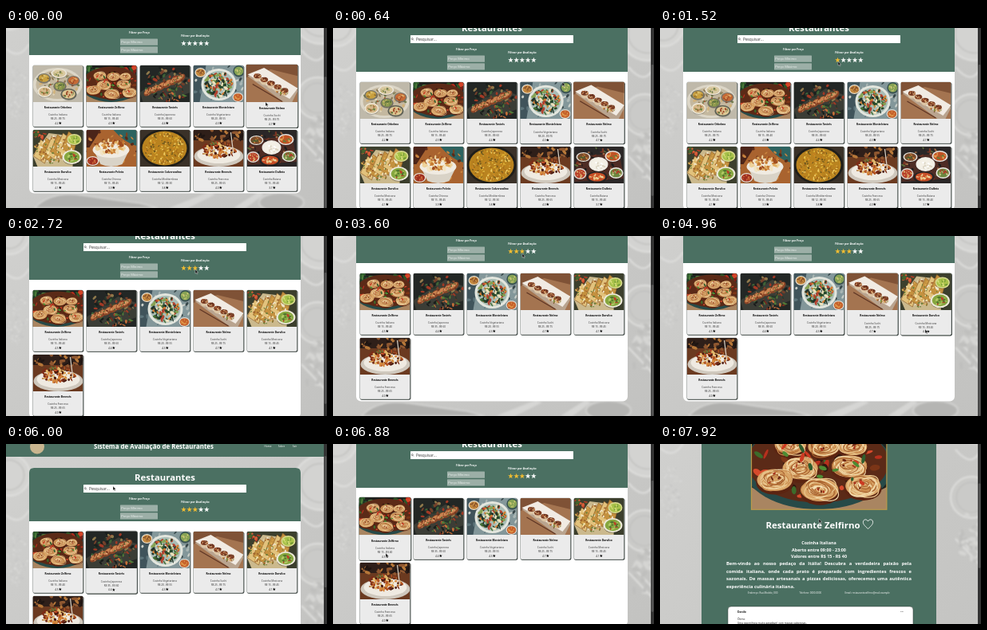
An HTML page that plays this animation: 402 by 226 pixels, repeating every 8 s.

```html
<!DOCTYPE html>
<html lang="pt">
<head>
<meta charset="utf-8">
<title>Restaurantes</title>
<style>
html, body { margin: 0; width: 100%; height: 100%; overflow: hidden; background: #c9c9c7; }
svg { display: block; width: 100vw; height: 100vh; }
svg, div { font-family: "Open Sans", "Noto Sans", sans-serif; }
.b { font-weight: 700; }
.about { color: #fff; font-weight: 700; font-size: 5.78px; line-height: 9.5px; }
.about div { text-align-last: justify; white-space: nowrap; }
.about div:last-child { text-align-last: left; }
</style>
</head>
<body>
<svg id="stage" viewBox="0 0 402 226" xmlns="http://www.w3.org/2000/svg"></svg>
<script>
const LOOP = 8000, TICK = 80, GREEN = '#4b7062';
const stage = document.getElementById('stage');

function seeded(seed) {
  return () => {
    seed = (seed * 16807) % 2147483647;
    return seed / 2147483647;
  };
}

// Drawing helpers
const rect = (x, y, w, h, fill, r = 0, more = '') =>
  `<rect x="${x}" y="${y}" width="${w}" height="${h}" rx="${r}" fill="${fill}" ${more}/>`;
const oval = (x, y, rx, ry, fill, more = '') =>
  `<ellipse cx="${x}" cy="${y}" rx="${rx}" ry="${ry}" fill="${fill}" ${more}/>`;
const path = (d, fill, more = '') => `<path d="${d}" fill="${fill}" ${more}/>`;
const text = (s, x, y, size, fill, bold = false, anchor = 'middle') =>
  `<text x="${x}" y="${y + size * 0.36}" font-size="${size}" fill="${fill}" text-anchor="${anchor}"${bold ? ' class="b"' : ''}>${s}</text>`;
const turn = (a, x, y) => `transform="rotate(${a} ${x} ${y})"`;

function starPath(r) {
  let d = '';
  for (let i = 0; i < 10; i++) {
    const a = i * Math.PI / 5, q = i % 2 ? r * 0.4 : r;
    d += `${i ? 'L' : 'M'}${(q * Math.sin(a)).toFixed(2)} ${(-q * Math.cos(a)).toFixed(2)}`;
  }
  return d + 'Z';
}

function scatter(seed, n, x, y, rx, ry, size, colors) {
  const rnd = seeded(seed * 7919);
  let out = '';
  for (let i = 0; i < n; i++) {
    const a = rnd() * 6.283, q = Math.sqrt(rnd());
    const cx = (x + rx * q * Math.cos(a)).toFixed(1), cy = (y + ry * q * Math.sin(a)).toFixed(1);
    const w = size * (0.5 + rnd()), h = size * (0.3 + rnd() * 0.5);
    out += oval(cx, cy, w.toFixed(1), h.toFixed(1), colors[i % colors.length], turn(Math.round(rnd() * 180), cx, cy));
  }
  return out;
}

function bowl(x, y, rx, ry, rim, food, seed) {
  return oval(x, y + 0.8, rx, ry, '#0005') + oval(x, y, rx, ry, rim) + oval(x, y, rx * 0.82, ry * 0.8, food[0]) +
    scatter(seed, 22, x, y, rx * 0.65, ry * 0.6, rx * 0.16, food);
}

// Loose swirl of pasta strands
function nest(x, y, r) {
  const rnd = seeded(Math.round(x * 977 + y * 131));
  const tones = ['#f3dcae', '#c98a4c', '#e9c68d', '#a8622f'];
  let out = oval(x, y + 1.5, r * 1.05, r * 0.66, '#5b2411') + oval(x, y, r, r * 0.62, '#d9a567');
  for (let i = 0; i < 20; i++) {
    const q = r * (0.25 + rnd() * 0.7), cx = x + (rnd() - 0.5) * 2.4, cy = y + (rnd() - 0.5) * 2.4;
    out += oval(cx.toFixed(1), cy.toFixed(1), q.toFixed(1), (q * 0.55).toFixed(1), 'none',
      `stroke="${tones[i % 4]}" stroke-width=".5" ${turn(Math.round(rnd() * 50 - 25), x, y)}`);
  }
  return out + scatter(x + 3, 6, x, y - 1, r * 0.5, r * 0.3, 0.8, ['#a8321c', '#f6e3bc', '#6b2413']);
}

// Pictures on a 63 x 46 area
const pictures = [
  () => rect(0, 0, 63, 46, '#bfb9aa') + oval(31, 24, 31, 21, '#dcd6c7') + oval(31, 24, 27, 18, '#c4b89f') +
    scatter(5, 60, 31, 24, 26, 17, 2, ['#e3d6b8', '#8d7a55', '#d2b27a', '#758052', '#a55f38']) +
    bowl(14, 16, 8, 6, '#77766d', ['#c9a03f', '#8a6426', '#dfc779'], 5) +
    bowl(33, 10, 10, 6, '#ebe6da', ['#d9c9a2', '#c4b874', '#6c7a4b'], 8) +
    bowl(51, 19, 8, 6, '#7a7469', ['#c66a35', '#8f3e20', '#e1b36d'], 13) +
    bowl(15, 33, 9, 7, '#eee8d8', ['#d6b98a', '#9f6b39', '#6f8642'], 21) +
    bowl(34, 26, 8, 6, '#6f6c60', ['#8d9a4e', '#53693a', '#c6b469'], 27) +
    bowl(45, 36, 10, 7, '#5f6256', ['#e0c894', '#9e4d2c', '#6b7d45'], 34),
  () => rect(-4, 0, 71, 46, '#1f211e') +
    scatter(44, 22, 7, 6, 11, 7, 3, ['#2f5d2d', '#1d3a24', '#4c7d3a']) +
    scatter(46, 20, 55, 7, 11, 7, 3.4, ['#b3291a', '#d54428', '#2f5426', '#7f1d13']) +
    path('M-4 34Q31 54 67 34V46H-4Z', '#a98561') +
    oval(31, 24, 38, 22, '#274a48') + oval(31, 22, 36, 20.5, '#5b2a17') +
    scatter(48, 50, 31, 24, 33, 16, 2, ['#b7301d', '#3d6b2b', '#7b3517', '#d64a2c', '#31180f']) +
    [[17, 13, 8], [34, 14, 8], [49, 14, 7], [22, 25, 9], [47, 24, 9], [9, 31, 9], [54, 34, 9], [32, 36, 9.5]]
      .map(n => nest(...n)).join('') +
    scatter(65, 14, 31, 25, 28, 15, 1.7, ['#4d8b33', '#cc3a22', '#2f5d2d']),
  () => rect(0, 0, 63, 46, '#232725') + path('M0 34L40 8L63 16V34L30 46H4Z', '#3b3d36') +
    scatter(17, 70, 32, 20, 31, 17, 2.4, ['#3e6337', '#73402a', '#26372a', '#a13925', '#1a1f1c', '#8f7a4c']) +
    [0, 1, 2, 3, 4, 5].map(i => {
      const x = 11 + i * 8, y = 33 - i * 3.4;
      return oval(x, y, 7, 4, '#8a4527', turn(-40, x, y)) + oval(x, y - 1, 5.6, 2.2, '#c9824f', turn(-40, x, y)) +
        scatter(20 + i, 9, x, y, 5, 3.5, 1.1, ['#e8b986', '#6b2d18', '#4f6b34']);
    }).join('') +
    scatter(29, 34, 40, 37, 23, 8, 1.8, ['#527b38', '#c76e3b', '#722f21', '#191d1b']),
  () => rect(0, 0, 63, 46, '#83979a') + path('M0 0H16L8 46H0Z', '#40545b') +
    scatter(70, 34, 31, 23, 34, 25, 2.4, ['#a9b6b4', '#5d757b', '#c9cec8', '#39494c']) +
    oval(32, 24, 22, 20, '#e3e6de') + oval(32, 24, 19, 17, '#a9bdb6') +
    scatter(71, 130, 32, 24, 17, 15, 2.3, ['#456f36', '#d77c31', '#86a254', '#eee2bd', '#28482d', '#b4422f', '#20332a']) +
    bowl(9, 9, 7, 6, '#e6dfd2', ['#c68b40', '#834b28'], 31) + bowl(57, 7, 7, 7, '#324f50', ['#86a254', '#d7cd79'], 7) +
    bowl(56, 40, 7, 6, '#dfe0d9', ['#c5612c', '#e4a04d'], 9),
  () => rect(0, 0, 63, 46, '#a47450') + path('M0 0H63V14L30 6L0 16Z', '#7f5236') +
    path('M2 14L22 6L63 32L56 46H46Z', '#b9a48f') + path('M2 12L22 4L63 29L53 42Z', '#f1ebe3') +
    [0, 1, 2, 3, 4].map(i => {
      const x = 14 + i * 8.2, y = 14 + i * 4.4;
      return oval(x, y + 2, 5, 4.6, '#dcc5a5') + oval(x, y, 4.6, 3, '#7c3d24') +
        scatter(50 + i, 10, x, y, 4, 2.6, 1, ['#e8bd86', '#4e2518', '#b9683a']);
    }).join('') +
    path('M8 24L44 45', 'none', 'stroke="#5d3423" stroke-width="1.2"') +
    scatter(57, 12, 45, 34, 8, 4, 1.2, ['#c9852f', '#6f8a43', '#7c3d24']),
  () => rect(0, 0, 63, 46, '#3c3f2d') + path('M0 32L20 4L52 8L50 46H6Z', '#cbb98d') +
    [0, 1, 2, 3, 4, 5].map(i => path(`M${1 + i * 7} ${33 - i * 2}l9 -21 11 9 -6 21z`, i % 2 ? '#c4913f' : '#e2c27c', 'stroke="#8a5a26" stroke-width=".6"')).join('') +
    scatter(83, 90, 25, 25, 24, 17, 1.5, ['#f3e0aa', '#9f622c', '#d9a850', '#6d803a', '#efe6cc']) +
    bowl(52, 12, 9, 7, '#d8d98f', ['#a9c24a', '#d9dd7c', '#6f9632'], 19) +
    bowl(49, 34, 12, 9, '#ede9d8', ['#86a73f', '#b4ca68', '#4f762d', '#b93c26'], 91) +
    scatter(85, 12, 8, 6, 8, 5, 2.4, ['#b23a26', '#d55e38', '#47632c']),
  () => rect(0, 0, 63, 46, '#a9632f') + path('M34 0H63V20Q48 16 34 0Z', '#2d6360') + path('M0 0H18L4 22H0Z', '#4a2419') +
    scatter(45, 30, 31, 23, 33, 24, 2.2, ['#7e4220', '#c9843f', '#592b18']) +
    path('M9 25H54L45 43Q31 49 18 43Z', '#d9d3c7') + oval(31, 25, 23, 10, '#f0ebe2') +
    scatter(47, 60, 31, 21, 19, 9, 2.8, ['#c77b31', '#efd39b', '#9e4c20', '#e1ad60', '#f2e4c4']) +
    bowl(8, 39, 8, 6, '#ede7db', ['#9e2f20', '#d06d3b'], 14),
  () => rect(0, 0, 63, 46, '#3a3128') + oval(31, 23, 31, 24, '#1f1e1a') + oval(31, 23, 28, 21.5, '#b9831f') +
    scatter(53, 230, 31, 23, 26, 20, 1.3, ['#dfb237', '#a66b1b', '#efce65', '#6c571f', '#c78421']),
  () => rect(0, 0, 63, 46, '#6b3a20') + rect(0, 0, 63, 13, '#2f1f19') +
    scatter(35, 30, 31, 8, 32, 9, 2.8, ['#8f5730', '#1f1512', '#b77839']) +
    oval(32, 33, 31, 13, '#cfc8bd') + oval(32, 31, 27, 11, '#efeae1') +
    scatter(37, 100, 32, 25, 21, 9, 2.2, ['#b35322', '#d78a3d', '#7c2c17', '#e1b86b', '#4d1c10']) +
    path('M47 3L50 27', 'none', 'stroke="#d7d0c3" stroke-width="1.3"') + scatter(9, 9, 30, 18, 9, 3, 1.6, ['#627939', '#c03b23']),
  () => rect(0, 0, 63, 46, '#2b2727') + path('M4 12L57 8L63 40L1 44Z', '#4e2c24') +
    scatter(61, 40, 31, 23, 32, 23, 2, ['#7a3523', '#1d1b1b', '#a06a42', '#5e6f3c']) +
    bowl(12, 13, 9, 6, '#e4e0d8', ['#7c4a2a', '#d08a3d', '#4c5e30'], 62) + bowl(49, 12, 10, 7, '#e5e1dc', ['#c25325', '#e0a354', '#5e7d37'], 63) +
    bowl(31, 22, 12, 9, '#efece5', ['#f4f0e6', '#ddd6c5', '#fff'], 60) +
    bowl(29, 38, 13, 7, '#252526', ['#c64c25', '#df8e46', '#edd6a0'], 64) +
    bowl(53, 33, 9, 7, '#eceae5', ['#6d8740', '#af3927', '#c9d08c'], 66) + bowl(8, 34, 8, 7, '#ddd9d1', ['#b8402a', '#dfbc73'], 67)
];

const places = [
  ['Orbelmo', 'Indiana', 25, 75, '4.2'], ['Zelfirno', 'Italiana', 15, 40, '4.5'],
  ['Tavirés', 'Japonesa', 35, 60, '4.4'], ['Montelviara', 'Vegetariana', 20, 55, '4.3'],
  ['Nelmo', 'Sushi', 25, 75, '4.7'], ['Darvilco', 'Mexicana', 15, 45, '4.1'],
  ['Pelvós', 'Chinesa', 15, 45, '3.9'], ['Calverandino', 'Mediterrânea', 12, 30, '3.8'],
  ['Brenvés', 'Francesa', 25, 65, '4.0'], ['Dulbrio', 'Baiana', 15, 40, '3.7']
];
const allCards = places.map((_, i) => i), bestCards = [1, 2, 3, 4, 5, 8];

function card([name, food, low, high, score], i) {
  return `<g class="card">` + rect(0.5, 0.6, 63.4, 77.2, '#2c3431', 2) +
    rect(0, 0, 63, 77, '#ebebeb', 2, 'stroke="#59645f" stroke-width=".4"') +
    `<use href="#pic${i}" clip-path="url(#frame)"/>` +
    text('Restaurante ' + name, 31.5, 53, 3.2, '#000', true) +
    text('Cozinha ' + food, 31.5, 62.3, 3.15, '#3c3c3c') +
    text(`R$ ${low} - R$ ${high}`, 31.5, 67.3, 3, '#222') +
    text(score, 29.8, 72.5, 3, '#111') + path(starPath(2), '#000', 'transform="translate(34.3 72.4)"') + '</g>';
}

// Pale, softly blurred table with dishes and cutlery
function backdrop(h, seed) {
  const dish = (x, y, r, c) => oval(x, y, r, r, c, 'stroke="#dfdfdd" stroke-width="2"') +
    oval(x, y, r * 0.72, r * 0.72, 'none', 'stroke="#c0c0be" stroke-width="1.5"');
  return rect(0, 0, 402, h, 'url(#grey)') + '<g filter="url(#soft)">' +
    dish(394, 70, 34, '#d3d3d1') + dish(390, 172, 26, '#cacac8') + dish(4, 60, 26, '#d4d4d2') +
    scatter(seed, 70, 13, 165, 15, 34, 1.1, ['#dededc', '#bababa', '#e3e3e1']) +
    path(`M36 ${h}q20 -22 60 -16t72 10l22 6Z`, '#b0b0ae', 'stroke="#d6d6d4" stroke-width="1.5"') +
    path(`M204 ${h}l50 -20 8 3 -38 19M285 ${h}l31 -20 7 3 -24 18`, '#d6d6d4') +
    oval(345, h - 7, 28, 12, '#b5b5b3', 'stroke="#d2d2d0" stroke-width="2"') +
    path('M0 110Q17 125 29 104M370 112Q391 137 402 112M370 224l31 33M375 217l27 28', 'none', 'stroke="#dcdcda" stroke-width="2.5"') +
    scatter(seed + 6, 24, 388, 225, 14, 36, 4, ['#bfbfbd', '#d5d5d3']) + '</g>';
}

const header = rect(0, 0, 402, 37, GREEN) + oval(39, 24.5, 9, 9, '#c9b58f') +
  text('Sistema de Avaliação de Restaurantes', 185, 24, 7.93, '#fff', true) +
  text('Home', 328, 24, 3.1, '#fff') + text('Sobre', 345, 24, 3.1, '#fff') + text('Sair', 361.5, 24, 3.1, '#fff');

const priceBox = (label, y) => rect(143, y, 47, 8.3, '#9cafa7', 0.6) + text(label, 144.3, y + 4.1, 4.1, '#f0f4f2', false, 'start');

const listPage = backdrop(310, 11) + header +
  rect(29, 51, 340, 240.5, '#fff', 6) + path('M29 118V57q0 -6 6 -6H363q6 0 6 6V118Z', GREEN) +
  text('Restaurantes', 199, 62.7, 11.4, '#fff', true) + rect(97, 72, 204, 10, '#fff', 0.5) +
  '<circle cx="99.3" cy="76.6" r="1" fill="none" stroke="#222" stroke-width=".5"/>' +
  path('M100 77.4l1.1 1.1', 'none', 'stroke="#222" stroke-width=".5"') +
  text('Pesquisar...', 104, 77, 4.8, '#333', false, 'start') +
  text('Filtrar por Preço', 167, 90.3, 3.2, '#fff', true) + priceBox('Preço Mínimo', 97.5) + priceBox('Preço Máximo', 107.2) +
  text('Filtrar por Avaliação', 237, 94, 3.5, '#fff', true) +
  [0, 1, 2, 3, 4].map(i => path(starPath(3.5), '#fff', `class="star" transform="translate(${222.5 + i * 7.2} 103.3)"`)).join('') +
  places.map(card).join('');

const about = ['Bem-vindo ao nosso pedaço da Itália! Descubra a verdadeira paixão pela',
  'comida italiana, onde cada prato é preparado com ingredientes frescos e',
  'sazonais. De massas artesanais a pizzas deliciosas, oferecemos uma autêntica',
  'experiência culinária italiana.'];

const detailPage = backdrop(480, 29) + header + rect(52, 51, 294, 415, '#476d5e', 6, 'opacity=".97"') +
  '<g clip-path="url(#photo)"><use href="#pic1" transform="translate(121.5 74) scale(2.46)"/></g>' +
  rect(114.5, 74.5, 169.4, 112.8, 'none', 0, 'stroke="#b99a4c" stroke-width="1.2"') +
  text('Restaurante Zelfirno', 191.5, 206.5, 11.45, '#fff', true) +
  path('M260.5 211.5C256 207.5 254.4 205.5 254.4 203.2C254.4 199.2 259 198.8 260.5 202C262 198.8 266.6 199.2 266.6 203.2C266.6 205.5 265 207.5 260.5 211.5Z', 'none', 'stroke="#fff" stroke-width=".8"') +
  text('Cozinha Italiana', 199, 229.5, 5.38, '#fff', true) + text('Aberto entre 09:00 - 23:00', 199, 237.7, 5.38, '#fff', true) +
  text('Valores entre R$ 15 - R$ 40', 199, 246, 5.38, '#fff', true) +
  `<foreignObject x="83" y="251" width="232" height="42"><div class="about">${about.map(s => `<div>${s}</div>`).join('')}</div></foreignObject>` +
  text('Endereço: Rua Modelo, 000', 110, 292.3, 2.95, '#fff', false, 'start') +
  text('Telefone: 0000-0000', 174.5, 292.3, 2.95, '#fff', false, 'start') +
  text('Email: restaurantezelfirno@mail.example', 231.5, 292.3, 2.95, '#fff', false, 'start') +
  rect(85, 309, 232, 62, '#fff', 4, 'stroke="#2f3a35" stroke-width=".5"') +
  text('Danilo', 97, 316, 3.4, '#111', true, 'start') + text('•••', 303, 316, 3, '#222') +
  text('Ótimo', 97, 325.2, 3.2, '#111', false, 'start') +
  text('Uma experiência muito agradável, com massas saborosas.', 97, 330.2, 3.2, '#111', false, 'start');

stage.innerHTML = `<defs>
  <linearGradient id="grey" x2="1" y2="1"><stop stop-color="#d2d2d0"/><stop offset=".5" stop-color="#c9c9c7"/><stop offset="1" stop-color="#c2c2c0"/></linearGradient>
  <filter id="soft"><feGaussianBlur stdDeviation="1.2"/></filter>
  <clipPath id="frame"><path d="M0 46V2Q0 0 2 0H61Q63 0 63 2V46Z"/></clipPath>
  <clipPath id="photo"><rect x="114" y="74" width="170" height="113"/></clipPath>
  ${pictures.map((p, i) => `<g id="pic${i}">${p()}</g>`).join('')}
  </defs><g id="list">${listPage}</g><g id="detail">${detailPage}</g>` +
  rect(398, 0, 4, 226, '#333') + rect(398.6, 0, 2.8, 165, '#555', 1, 'id="thumb"') +
  path('M0 0V5.2L1.2 4.1L2.1 6L3 5.6L2.1 3.8H3.7Z', '#111', 'id="cursor" stroke="#fff" stroke-width=".35"');

const get = id => document.getElementById(id);
const list = get('list'), detail = get('detail'), thumb = get('thumb'), cursor = get('cursor');
const cards = [...document.querySelectorAll('.card')], stars = [...document.querySelectorAll('.star')];

// Keys: time followed by the values
const scrollKeys = [[0, 84], [240, 84], [640, 63], [2800, 63], [3120, 84], [5440, 84], [5760, 21], [6240, 21], [6560, 63]];
const detailKeys = [[7200, 0], [7840, 105]];
const cursorKeys = [[0, 325, 93], [240, 325, 93], [960, 260, 50], [1440, 223, 42], [1920, 223, 42], [2080, 230, 42],
  [2480, 237, 42], [2960, 237, 42], [3120, 237, 22], [3600, 237, 22], [3920, 66, 98], [4320, 66, 165], [4560, 66, 110],
  [4960, 332, 117], [5360, 332, 117], [5680, 134, 140], [5920, 134, 122], [6000, 134, 53], [6320, 134, 53],
  [6640, 66, 137], [7120, 66, 137], [7600, 199, 94]];

function track(keys, t, axis = 1) {
  const i = keys.findIndex(k => k[0] > t);
  if (i < 0) return keys[keys.length - 1][axis];
  if (i === 0) return keys[0][axis];
  const a = keys[i - 1], b = keys[i], u = (t - a[0]) / (b[0] - a[0]);
  return a[axis] + (b[axis] - a[axis]) * u * u * (3 - 2 * u);
}

const shownAt = t => t < 2720 ? allCards : bestCards;
const cardX = n => 33.5 + (n % 5) * 67;
const cardY = n => 131 + Math.floor(n / 5) * 81;

function hovered(n, t) {
  const x = track(cursorKeys, t) - cardX(n), y = track(cursorKeys, t, 2) + track(scrollKeys, t) - cardY(n);
  return x >= 0 && x <= 63 && y >= 0 && y <= 77;
}

// Share of the last 200 ms spent over the card
function lift(n, t) {
  let sum = 0;
  for (let k = 0; k < 10; k++) sum += hovered(n, Math.max(0, t - k * 20));
  return sum / 10;
}

function draw(t) {
  const onDetail = t >= 7120;
  const scroll = onDetail ? track(detailKeys, t) : track(scrollKeys, t);
  list.style.display = onDetail ? 'none' : '';
  detail.style.display = onDetail ? '' : 'none';
  (onDetail ? detail : list).setAttribute('transform', `translate(0 ${-scroll})`);

  const height = onDetail ? 480 : 310;
  thumb.setAttribute('height', 226 * 226 / height);
  thumb.setAttribute('y', scroll * 226 / height);
  cursor.setAttribute('transform', `translate(${track(cursorKeys, t)} ${track(cursorKeys, t, 2)})`);
  if (onDetail) return;

  const rating = t < 1440 ? 0 : t < 2080 ? 1 : t < 2480 ? 2 : 3;
  stars.forEach((s, i) => s.setAttribute('fill', i < rating ? '#f3bd32' : '#fff'));
  const shown = shownAt(t);
  cards.forEach((c, i) => {
    const n = shown.indexOf(i);
    c.style.display = n < 0 ? 'none' : '';
    if (n < 0) return;
    const k = 1 + 0.03 * lift(n, t);
    c.setAttribute('transform', `translate(${cardX(n) + 31.5} ${cardY(n) + 38.5}) scale(${k}) translate(-31.5 -38.5)`);
  });
}

const start = performance.now();
function loop() {
  const t = (performance.now() - start) % LOOP;
  draw(Math.floor(t / TICK) * TICK);
  requestAnimationFrame(loop);
}
loop();
</script>
</body>
</html>
```
